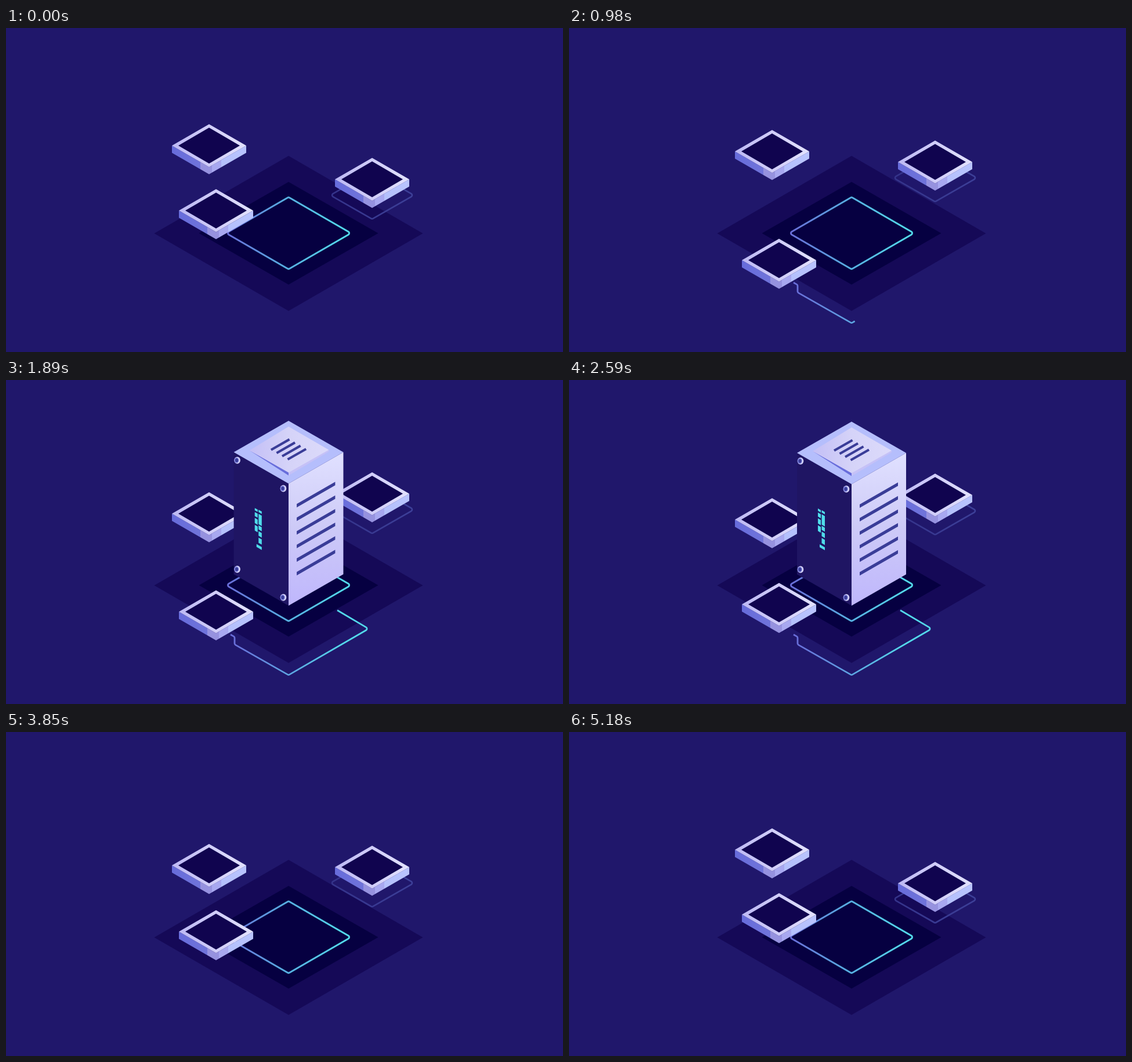
These frames come from a looping animation (960x560 px, 5.25 s). An HTML page with a canvas:

```html
<!DOCTYPE html>
<html lang="en">
<head>
<meta charset="utf-8">
<title>Isometric server</title>
<style>
html, body { margin: 0; width: 100%; height: 100%; overflow: hidden; background: #20176b; }
canvas { display: block; }
</style>
</head>
<body>
<canvas id="stage" width="960" height="560"></canvas>
<script>
const ctx = document.getElementById('stage').getContext('2d');
const LOOP = 5250;
const SLOT = '#3a3d98';
const SLOPE = 0.577;

// Eased value at time t through [time, value] keys.
function track(t, keys) {
  if (t <= keys[0][0]) return keys[0][1];
  for (let i = 1; i < keys.length; i++) {
    const [t0, a] = keys[i - 1], [t1, b] = keys[i];
    if (t <= t1) {
      const s = (t - t0) / (t1 - t0);
      return a + (b - a) * s * s * (3 - 2 * s);
    }
  }
  return keys[keys.length - 1][1];
}

function gradient(x0, y0, x1, y1, ...stops) {
  const g = ctx.createLinearGradient(x0, y0, x1, y1);
  stops.forEach(([at, color]) => g.addColorStop(at, color));
  return g;
}

function poly(fill, ...points) {
  ctx.beginPath();
  points.forEach(([x, y]) => ctx.lineTo(x, y));
  ctx.closePath();
  ctx.fillStyle = fill;
  ctx.fill();
}

const rhombus = (x, y, w, h) => [[x, y - h], [x + w, y], [x, y + h], [x - w, y]];

function outline(x, y, w, h, color, width) {
  const p = rhombus(x, y, w, h);
  ctx.beginPath();
  ctx.moveTo(x - w / 2, y - h / 2);
  p.forEach((a, i) => ctx.arcTo(...a, ...p[(i + 1) % 4], 3));
  ctx.closePath();
  ctx.strokeStyle = color;
  ctx.lineWidth = width;
  ctx.stroke();
}

function tile(x, top) {
  const y = top + 37, left = x - 64, right = x + 64;
  const side = gradient(left, 0, right, 0,
    [0, '#676cdb'], [0.383, '#7074da'], [0.383, '#9692df'], [0.54, '#9692df'],
    [0.54, '#a8a8f0'], [0.664, '#a8a8f0'], [0.664, '#b4c0fc'], [1, '#b9c4fe']);
  poly(side, [left, y], [x, y + 37], [right, y], [right, y + 12.5], [x, y + 49.5], [left, y + 12.5]);
  poly(gradient(left, 0, right, 0, [0, '#bdb9f4'], [0.5, '#d0cdf9'], [1, '#e3e3ff']),
    ...rhombus(x, y, 64, 37));
  poly('#10044f', ...rhombus(x, y, 53, 31));
}

function cable(from, to) {
  if (to <= from) return;
  const length = 350;
  const p = [[387, 440], [394, 444], [394, 457], [487, 510], [625, 430], [571, 398]];
  ctx.beginPath();
  ctx.moveTo(...p[0]);
  for (let i = 1; i < 5; i++) ctx.arcTo(...p[i], ...p[i + 1], 3);
  ctx.lineTo(...p[5]);
  ctx.setLineDash([(to - from) * length + 2, 999]);
  ctx.lineDashOffset = -from * length;
  ctx.lineWidth = 2.8;
  ctx.strokeStyle = gradient(387, 0, 580, 0, [0, '#6a6cd9'], [1, '#53d9ea']);
  ctx.stroke();
  ctx.setLineDash([]);
}

function light(x, y, w, h) {
  const drop = w * SLOPE;
  poly('#4fdcea', [x, y], [x + w, y + drop], [x + w, y + h + drop], [x, y + h]);
}

function knob(x, y) {
  [[0, 5.3, 6, '#d6d4f8'], [-1.3, 4, 4.8, '#7d80de'], [-1, 2.6, 3.2, SLOT]].forEach(([dx, rx, ry, color]) => {
    ctx.beginPath();
    ctx.ellipse(x + dx, y, rx, ry, 0, 0, Math.PI * 2);
    ctx.fillStyle = color;
    ctx.fill();
  });
}

function server(scale) {
  if (scale <= 0) return;
  ctx.save();
  ctx.translate(487, 414);
  ctx.scale(scale, scale);
  ctx.translate(-487, -414);

  // Body
  poly('#1f1563', [393, 126], [487, 180], [487, 390], [393, 336]);
  poly(gradient(0, 130, 0, 380, [0, '#e0e0ff'], [0.5, '#cdcaf7'], [1, '#c0b8fc']),
    [487, 180], [581, 126], [581, 336], [487, 390]);
  poly('#b5befc', ...rhombus(487, 126, 94, 54));

  // Raised lid with vents
  poly('#686ddb', [420, 123], [487, 160], [487, 166]);
  poly('#c5c1f7', [487, 160], [556, 122], [556, 125], [487, 166]);
  poly(gradient(420, 0, 556, 0, [0, '#c4bff6'], [0.5, '#d5d3f8'], [1, '#dcdafa']),
    [487, 82], [556, 122], [487, 161], [420, 123]);
  ctx.lineWidth = 4.2;
  ctx.strokeStyle = SLOT;
  for (let i = 0; i < 4; i++) {
    ctx.beginPath();
    ctx.moveTo(457 + i * 9.5, 122 + i * 5.5);
    ctx.lineTo(488.5 + i * 9.5, 104 + i * 5.5);
    ctx.stroke();
  }

  // Side slots
  for (let i = 0; i < 6; i++) {
    const y = 177 + i * 23.4;
    poly(SLOT, [501, y + 38], [567, y], [567, y + 6], [501, y + 44]);
  }

  // Front panel
  [[399, 140], [478, 188.5], [399, 327.5], [478, 376]].forEach(p => knob(...p));
  [[222, 4], [229, 7], [239, 9], [251, 10]].forEach(([y, h]) => light(429, y, 5, h));
  [[225, 4], [232, 18], [252, 7], [262, 8], [273, 9]].forEach(([y, h]) => light(435.5, y, 5.5, h));
  light(432, 284, 9, 5);
  ctx.restore();
}

function draw(t) {
  const leftTop = track(t, [[0, 166.3], [3000, 206.3], [LOOP, 166.3]]);
  const rightTop = track(t, [[0, 224.5], [2110, 157.5], [LOOP, 224.5]]);
  const frontTop = track(t, [[0, 278.5], [770, 364.3], [1700, 364.3], [LOOP, 278.5]]);
  const scale = track(t, [[1400, 0], [1785, 1.015], [1950, 1], [2600, 1], [2714, 1.015], [3260, 0]]);

  ctx.fillStyle = '#20176b';
  ctx.fillRect(0, 0, 960, 560);
  poly('#150957', ...rhombus(487, 355, 231.5, 134));
  poly('#060041', ...rhombus(487, 354.7, 154.5, 88.7));
  outline(487, 354.6, 107.5, 62.2, gradient(380, 0, 580, 0, [0, '#6a6cd9'], [0.5, '#57aee1'], [1, '#53d9ea']), 3);
  cable(track(t, [[3230, 0], [3800, 1]]), track(t, [[690, 0], [1390, 1]]));

  tile(350, leftTop);
  outline(631, rightTop + 64.5, 72, 41.2, gradient(559, 0, 703, 0, [0, '#34338a'], [1, '#3d4099']), 2.6);
  tile(631, rightTop);
  server(scale);
  tile(362, frontTop);
}

function tick() {
  draw(performance.now() % LOOP);
  requestAnimationFrame(tick);
}
tick();
</script>
</body>
</html>
```
